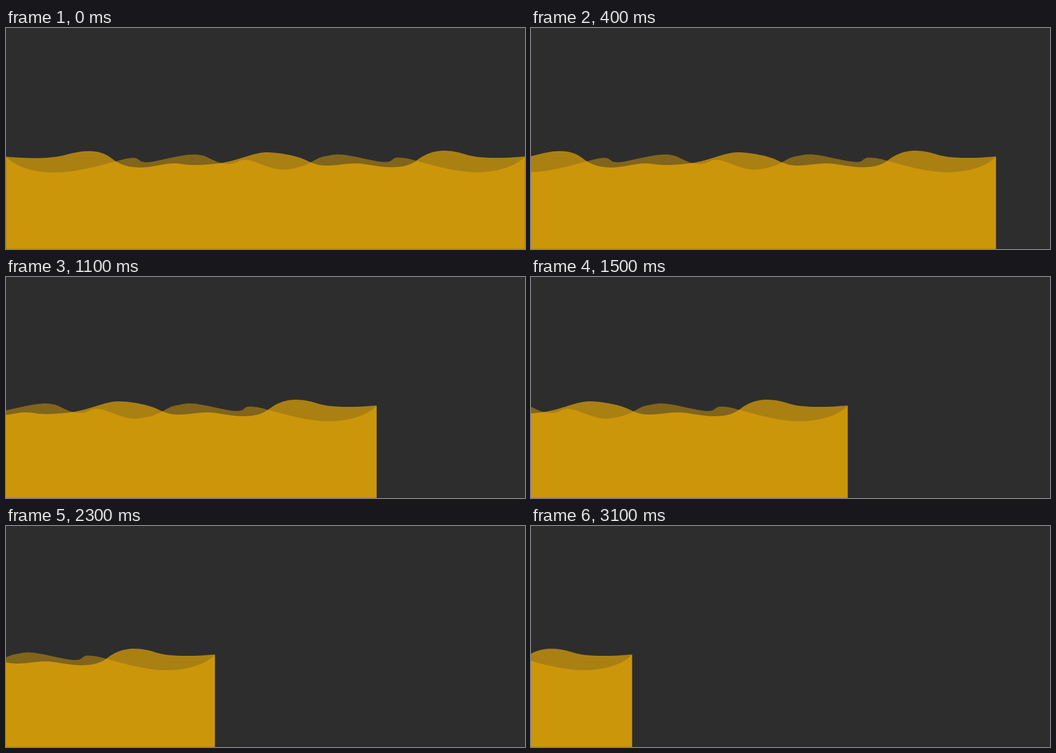
Recreate the animation shown at these times as an HTML page. Size 938 by 400 pixels, loop 3200 ms.

```html
<!DOCTYPE html>
<html lang="en">
<head>
<meta charset="utf-8">
<title>Waves</title>
<style>
  html, body { margin: 0; width: 100%; height: 100%; overflow: hidden; background: #2d2d2d; }
  svg { display: block; }
  #waves { fill: #ffb800; }
</style>
</head>
<body>
<svg width="938" height="400" viewBox="0 0 938 400">
  <g id="waves">
    <path opacity=".4" d="M0.3 233 C18 252 50 261.5 88 261.5 C124 261.5 158 252 198 241.5
      C210 238 221 235 229 235 C243 235 238 243 255 243 C270 243 313 229 338 229
      C349 229 359 231 364 234 C378 241 387 246 403 246 C417 246 420 238.5 432 238.5
      C448 238.5 478 256.5 500 256.5 C517 256.5 540 250 551 243 C562 237 566 234 577 232
      C585 230.5 592 228.7 601 228.7 C622 228.7 666 242.5 685 242.5
      C701 242.5 696 234.5 709 234.5 C722 234.5 737 239 744 241
      C782 252 818 261 850 261 C890 261 922 250 937.8 233 V400 H0.3 Z"/>
    <path opacity=".6" d="M0.3 233 C45 237 83 236.5 108 229.5 C133 222.5 167 216 191 236
      C206 248 223 252.5 242 252.5 C266 252.5 284 245 305 245 C317 245 323 248 338 248
      C357 248 373 246.5 388 244.5 C420 240 448 225 470 225 C492 225 523 231 537 237
      C551 243 560 249 580 249 C598 249 615 245 630 245 C650 245 672 252 697 252
      C718 252 731 248 742 240 C752 232 768 222 792 222 C809 222 822 226 831 229
      C857 237 899 236 937.8 232.5 V400 H0.3 Z"/>
  </g>
  <rect y="399" width="938" height="1" opacity=".1"/>
</svg>
<script>
  const LOOP = 3200, STEP = 100, SHIFT = 24.36;
  const waves = document.getElementById('waves');
  const start = performance.now();

  function draw() {
    const time = (performance.now() - start) % LOOP;
    const step = Math.floor(time / STEP);
    waves.setAttribute('transform', `translate(${-step * SHIFT} 0)`);
    requestAnimationFrame(draw);
  }
  draw();
</script>
</body>
</html>
```
